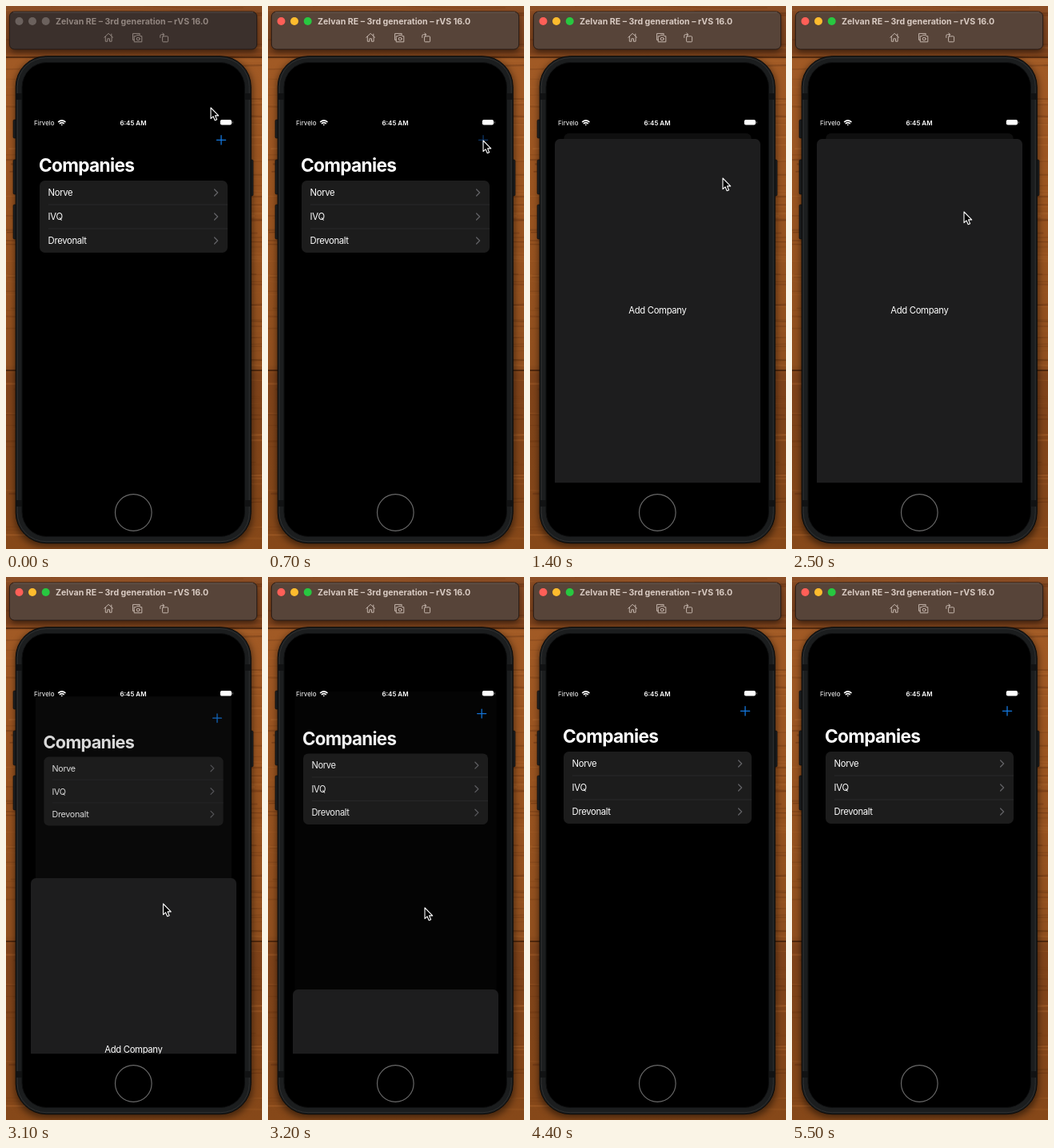
Recreate the animation shown at these times as an HTML page. Size 320 by 678 pixels, loop 5600 ms.

```html
<!DOCTYPE html>
<html lang="en">
<head>
<meta charset="utf-8">
<title>Add Company sheet</title>
<style>
  html, body { margin: 0; width: 100%; height: 100%; overflow: hidden; background: #8a4c20; }
  svg { display: block; width: 100%; height: 100%; }
  text { font-family: Inter, Roboto, sans-serif; fill: #fff; }
  .line { fill: none; stroke-linecap: round; stroke-linejoin: round; }
  .title { font-size: 10.6px; font-weight: 700; }
  .status { font-size: 8px; }
  .time { font-weight: 600; text-anchor: middle; }
  .heading { font-size: 22.7px; font-weight: 700; letter-spacing: -.7px; }
  .body { font-size: 11.3px; letter-spacing: -.33px; }

  #bar { --panel: #574439; --ink: #d8cac2; --icon: #c4b5ac; --red: #ff5f57; --amber: #febc2e; --green: #28c840; }
  #bar.idle { --panel: #3b302c; --ink: #91857f; --icon: #91857f; --red: #6b615d; --amber: #6b615d; --green: #6b615d; }
  #bar .panel { fill: var(--panel); stroke: #1e1512; stroke-width: .8; }
  #bar text { fill: var(--ink); }
  #bar .line { stroke: var(--icon); stroke-width: 1; }
</style>
</head>
<body>
<svg viewBox="0 0 320 678">
  <defs>
    <linearGradient id="plank" x2="0" y2="1">
      <stop offset="0" stop-color="#8c4e25"/>
      <stop offset=".085" stop-color="#7d421c"/>
      <stop offset=".1" stop-color="#a15a25"/>
      <stop offset=".35" stop-color="#9a5420"/>
      <stop offset=".66" stop-color="#91501f"/>
      <stop offset=".68" stop-color="#7f431a"/>
      <stop offset="1" stop-color="#864819"/>
    </linearGradient>
    <filter id="blur" x="-10%" y="-10%" width="120%" height="120%"><feGaussianBlur stdDeviation="4"/></filter>
    <clipPath id="screen"><rect x="31" y="139" width="257" height="456.3"/></clipPath>
  </defs>

  <rect width="320" height="678" fill="url(#plank)"/>
  <g id="grain" class="line"></g>

  <!-- phone -->
  <rect x="11" y="65" width="297" height="610" rx="37" opacity=".5" filter="url(#blur)"/>
  <g fill="#1c1d1e" stroke="#0c0c0c" stroke-width=".6">
    <rect x="9" y="142" width="5" height="23" rx="1.5"/>
    <rect x="9" y="192" width="5" height="43" rx="1.5"/>
    <rect x="9" y="248" width="5" height="43" rx="1.5"/>
    <rect x="304" y="192" width="5" height="45" rx="1.5"/>
  </g>
  <rect x="12.2" y="62.7" width="294" height="608" rx="38" fill="#1b1d1e" stroke="#090a0a"/>
  <rect x="14.2" y="64.7" width="290" height="604" rx="36" fill="none" stroke="#2d2f30"/>
  <path d="M13 113h8M13 621h8M298 113h8M298 621h8" stroke="#111213" stroke-width="8"/>
  <rect x="20" y="70.5" width="278.5" height="592" rx="31" fill="#000" stroke="#0f1011"/>
  <circle cx="159.3" cy="632.5" r="22.8" fill="none" stroke="#686868" stroke-width="1.2"/>

  <!-- app -->
  <g clip-path="url(#screen)">
    <g id="card">
      <rect id="page" x="31" y="139" width="257" height="457"/>
      <path id="plus" class="line" d="M263.4 167.3h11.2M269 161.7v11.2" stroke-width="1.3"/>
      <text class="heading" x="41" y="207">Companies</text>
      <rect id="group" x="42" y="218" width="235" height="90" rx="6.5"/>
      <g id="rows"></g>
      <rect id="dim" x="31" y="139" width="257" height="457"/>
    </g>
    <g id="sheet">
      <rect x="31" width="257" height="470" rx="6.5" fill="#1d1d1e"/>
      <text class="body" x="159.4" y="218.3" text-anchor="middle">Add Company</text>
    </g>
  </g>

  <text class="status" x="35" y="148.5">Firvelo</text>
  <g class="line" stroke="#fff" stroke-width="1.6" stroke-linecap="butt">
    <path d="M65.6 144.6q4.2-3.6 8.4 0M67.3 146.6q2.5-2.1 5 0"/>
    <path d="M69.8 148.3v.1" stroke-linecap="round"/>
  </g>
  <text class="status time" x="159" y="148.5">6:45 AM</text>
  <rect x="267.8" y="142" width="14.2" height="6.6" rx="2" fill="#fff"/>
  <rect x="282.6" y="144.2" width="1" height="2.2" rx=".5" fill="#999"/>

  <!-- window bar -->
  <rect x="5" y="10" width="309" height="48" rx="6" opacity=".5" filter="url(#blur)"/>
  <g id="bar">
    <rect class="panel" x="4.4" y="7" width="309.2" height="47" rx="6"/>
    <path d="M9 7.9h300" stroke="#fff" stroke-opacity=".2" stroke-width=".8"/>
    <circle cx="16.5" cy="19" r="5" fill="var(--red)"/>
    <circle cx="33" cy="19" r="5" fill="var(--amber)"/>
    <circle cx="49.7" cy="19" r="5" fill="var(--green)"/>
    <text class="title" x="62" y="22.8">Zelvan RE – 3rd generation – rVS 16.0</text>
    <g class="line">
      <path d="M122.8 39.2l5.4-4.9 5.4 4.9M124.3 38.2v6h2.6v-3.4h2.6v3.4h2.6v-6M131.8 35v2"/>
      <path d="M160.4 42.4h-1.8v-8h8.6v1.6M160.6 37.6h2l.8-1.2h3.4l.8 1.2h2.2v7.2h-9.2z"/>
      <circle cx="165.2" cy="41" r="1.9"/>
      <rect x="195.6" y="37.8" width="7" height="7" rx="1"/>
      <path d="M192.8 39.4v-2.2q0-1.6 1.6-1.6h3.2M196 33.8l1.8 1.8-1.8 1.7"/>
    </g>
  </g>

  <path id="cursor" d="M0 0V13.6L3 10.8 5.2 15.8 7.6 14.7 5.5 9.9H9.7Z" fill="#000" stroke="#fff" stroke-width="1.1" stroke-linejoin="round"/>
</svg>

<script>
const LOOP = 5600, STEP = 100;
const SHEET_UP = 166, SHEET_DOWN = 596;
const $ = id => document.getElementById(id);

// Each key: time, values...
const cursorKeys = [
  [0, 256, 127], [100, 257, 130], [300, 264, 153], [500, 269, 168],
  [1200, 269, 168], [1300, 262, 180], [1400, 241, 215], [1500, 222, 246], [1600, 215, 257],
  [2700, 215, 257], [2800, 213, 272], [2900, 205, 335], [3000, 199, 392],
  [3100, 196.5, 408], [3200, 196, 413], [3500, 196, 413],
  [3600, 202, 423], [3900, 309, 555], [4100, 328, 690]
];
const sheetKeys = [
  [700, SHEET_DOWN], [800, 424], [900, 246], [1000, 192], [1100, 173], [1200, SHEET_UP],
  [2700, SHEET_UP], [2800, 181], [2900, 244], [3000, 301],
  [3100, 376], [3200, 515], [3300, 576], [3400, SHEET_DOWN]
];

function sample(keys, t) {
  const next = keys.findIndex(k => k[0] > t);
  if (next === 0) return keys[0].slice(1);
  if (next < 0) return keys[keys.length - 1].slice(1);
  const a = keys[next - 1], b = keys[next];
  const f = (t - a[0]) / (b[0] - a[0]);
  return a.slice(1).map((v, i) => v + (b[i + 1] - v) * f);
}

function drawGrain() {
  let seed = 11;
  const rnd = () => (seed = seed * 16807 % 2147483647) / 2147483647;
  const tones = ["#5b2c0e", "#6f3813", "#b86f35", "#a9642c"];
  let out = "";
  for (let i = 0; i < 210; i++) {
    const y = rnd() * 678, x = rnd() * 260 - 60, tone = tones[Math.floor(rnd() * 4)];
    out += `<path d="M${x} ${y}q60 ${rnd() * 8 - 4} 120 0t120 ${rnd() * 6 - 3}" stroke="${tone}" stroke-width="${.5 + rnd() * 2}" opacity="${.15 + rnd() * .3}"/>`;
  }
  for (const y of [64, 455]) out += `<path d="M0 ${y}h320" stroke="#3d1c08" stroke-width="2.2" opacity=".7"/>`;
  $("grain").innerHTML = out;
}

function drawRows() {
  $("rows").innerHTML = ["Norve", "IVQ", "Drevonalt"].map((name, i) => {
    const y = 233 + 30 * i;
    const rule = i ? `<path d="M53 ${y - 15}H277" stroke="#303032" stroke-width=".7"/>` : "";
    return `${rule}<text class="body" x="52.6" y="${y + 4.2}">${name}</text>
      <path class="line" d="M260.6 ${y - 4}l4 4-4 4" stroke="#616165" stroke-width="1.3"/>`;
  }).join("");
}

function plusColor(t) {
  if (t < 700 || t >= 3000) return "#1479e0";
  return t < 800 ? "#0d3566" : "#4a4a4c";
}

const gray = v => `rgb(${v},${v},${v})`;

function render(t) {
  const [x, y] = sample(cursorKeys, t);
  const [top] = sample(sheetKeys, t);
  const p = (SHEET_DOWN - top) / (SHEET_DOWN - SHEET_UP);
  const scale = 1 - .0895 * p;

  $("bar").classList.toggle("idle", t < 700);
  $("cursor").setAttribute("transform", `translate(${x} ${y})`);
  $("sheet").setAttribute("transform", `translate(0 ${top})`);
  $("card").setAttribute("transform",
    `translate(159.5 ${139 + 20 * p}) scale(${scale}) translate(-159.5 -139)`);
  $("page").setAttribute("fill", gray(22 * p));
  $("page").setAttribute("rx", 7 * p);
  $("group").setAttribute("fill", gray(28 + 9 * p));
  $("dim").setAttribute("rx", 7 * p);
  $("dim").setAttribute("opacity", .3 * p);
  $("plus").setAttribute("stroke", plusColor(t));
}

drawGrain();
drawRows();
render(0);

const start = performance.now();
function tick() {
  const t = (performance.now() - start) % LOOP;
  render(Math.floor(t / STEP) * STEP);
  requestAnimationFrame(tick);
}
requestAnimationFrame(tick);
</script>
</body>
</html>
```
